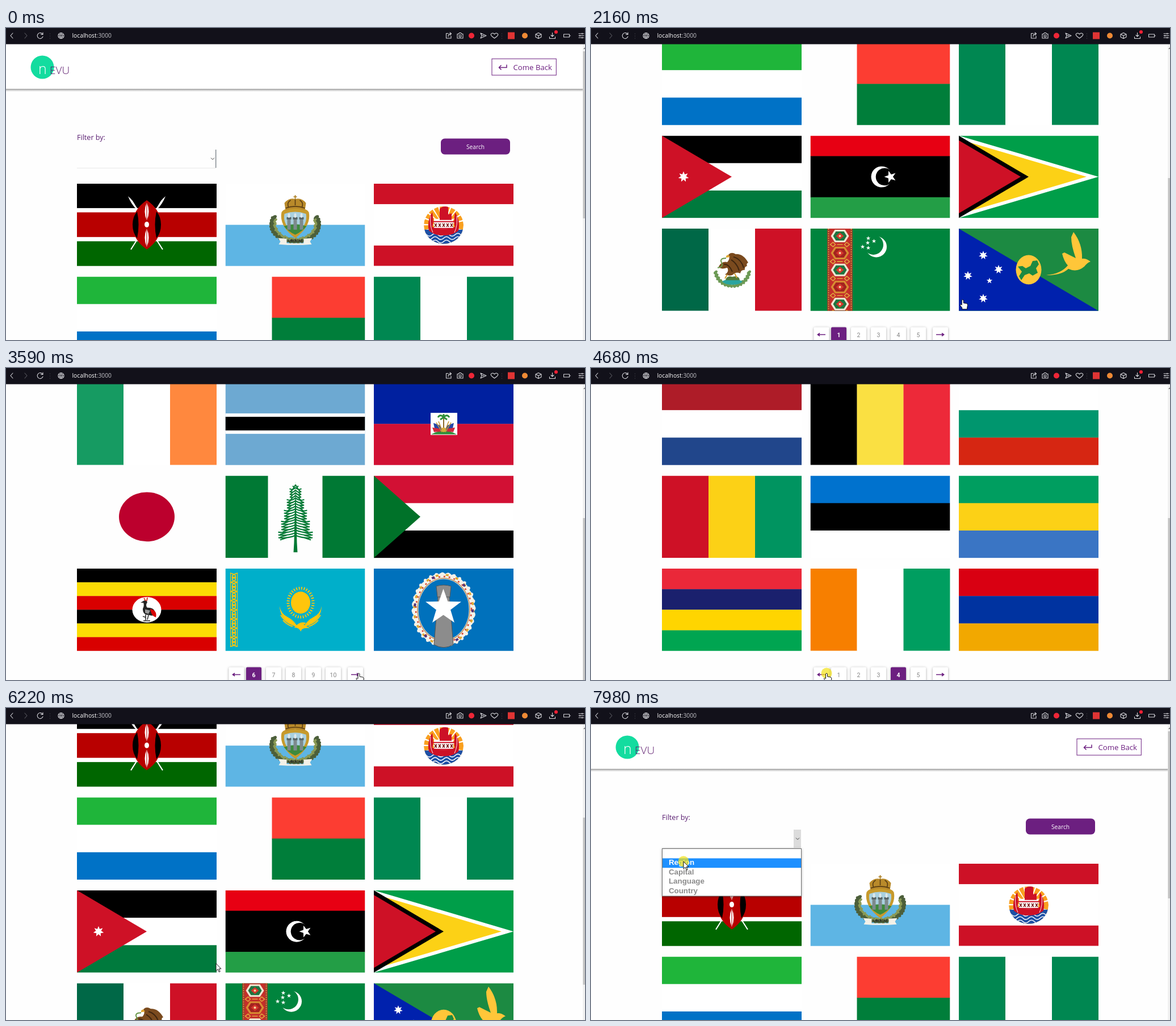
Recreate the animation shown at these times as an HTML page. Size 1020 by 549 pixels, loop 8 s.

```html
<!DOCTYPE html>
<html lang="en">
<head>
<meta charset="utf-8">
<title>Flags</title>
<style>
html, body { margin: 0; width: 100%; height: 100%; overflow: hidden; background: #fefefe; }
#stage { display: block; width: 1020px; height: 549px; }
text { font-family: "Open Sans", "Noto Sans", sans-serif; }
.num { font: 10.5px Roboto, Arial, sans-serif; text-anchor: middle; }
.opt { font: bold 13.3px "Liberation Sans", Arial, sans-serif; }
.box { filter: drop-shadow(0 1px 2px #0005); }
.line { fill: none; stroke: #d5d5da; stroke-width: 1.1; stroke-linecap: round; stroke-linejoin: round; }
</style>
</head>
<body>
<svg id="stage" viewBox="0 0 1020 549" xmlns="http://www.w3.org/2000/svg">
  <defs>
    <linearGradient id="shade" x2="0" y2="1">
      <stop offset="0" stop-color="#8a8a8a"/><stop offset=".4" stop-color="#b9b9b9"/><stop offset="1" stop-color="#fefefe"/>
    </linearGradient>
    <clipPath id="disc"><ellipse cx="123" cy="73" rx="35" ry="33"/></clipPath>
  </defs>
  <rect width="1020" height="549" fill="#fefefe"/>
  <g id="content">
    <rect y="106" width="1016" height="6" fill="url(#shade)"/>
    <rect y="20" width="1016" height="87" fill="#fff"/>
    <circle cx="64" cy="69" r="20.5" fill="#13dc9f"/>
    <text x="57" y="81" font-size="25" font-weight="300" fill="#fff">n</text>
    <text x="77" y="81" font-size="19" font-weight="300" fill="#5d1a6e">EVU</text>
    <rect x="856" y="54.2" width="113.3" height="28.8" fill="#fff" stroke="#6c1f80"/>
    <path d="M882 64.5V69.5H868.5M872.5 65.5L868.5 69.5 872.5 73.5" fill="none" stroke="#6c1f80" stroke-width="1.5"/>
    <text x="893.5" y="74" font-size="13.2" fill="#6c1f80">Come Back</text>
    <text x="125" y="197" font-size="12.6" fill="#5b1f72">Filter by:</text>
    <rect x="766" y="194.5" width="122" height="28" rx="7" fill="#6c1f80"/>
    <text x="827" y="212.5" font-size="10.2" fill="#fff" text-anchor="middle">Search</text>
    <path d="M125 246.5H370" stroke="#e9e9e9"/>
    <rect id="knob" x="357" y="214" width="13" height="32" fill="#dcdcdc"/>
    <path id="edge" d="M369.7 214V246" stroke="#6a737a" stroke-width="1.2"/>
    <path d="M361 228.5l3 3 3-3" fill="none" stroke="#444"/>
    <g id="pages"></g>
    <g id="pager"></g>
    <g id="menu"></g>
  </g>
  <rect x="1016" y="29" width="4" height="520" fill="#f1f1f1"/>
  <path d="M1017 37l3-3v3z" fill="#777"/>
  <rect id="thumb" x="1016.5" y="41" width="3.5" height="294" fill="#c4c4c4"/>
  <g id="bar"></g>
  <g id="popup">
    <path d="M373 498H461a4 4 0 0 1 4 4V517a4 4 0 0 1-4 4H421l-4 5-4-5H373a4 4 0 0 1-4-4V502a4 4 0 0 1 4-4z" fill="#d6d6d8" class="box"/>
    <path d="M422.5 499V520" stroke="#dededf"/>
    <text x="378" y="512.5" font-size="7.7" fill="#fff">Pesquisar</text>
    <text x="431" y="512.5" font-size="7.7" fill="#fff">Copiar</text>
  </g>
  <circle id="ring" r="9.5" fill="#f2e21c" opacity=".72"/>
  <path id="cursor" fill="#fff" stroke="#000" stroke-width=".9" stroke-linejoin="round"/>
</svg>
<script>
const $ = id => document.getElementById(id);
const W = 246, H = 145, PITCH = 163.5, TOP = 274, COLS = [125, 386.5, 648];
const PURPLE = '#6c1f80', MAX = 411.5;

// Shapes
const rect = (x, y, w, h, f) => `<rect x="${x}" y="${y}" width="${w}" height="${h}" fill="${f}"/>`;
const oval = (x, y, rx, ry, f, more = '') => `<ellipse cx="${x}" cy="${y}" rx="${rx}" ry="${ry}" fill="${f}" ${more}/>`;
const path = (d, f) => `<path d="${d}" fill="${f}"/>`;
const line = (d, s, w = 1, more = '') => `<path d="${d}" fill="none" stroke="${s}" stroke-width="${w}" ${more}/>`;
const range = (n, fn) => Array.from({ length: n }, (_, i) => fn(i)).join('');
function star(x, y, r, f, n = 5, inner = .4, turn = -90) {
  let d = '';
  for (let i = 0; i < n * 2; i++) {
    const a = (turn + i * 180 / n) * Math.PI / 180, q = i % 2 ? r * inner : r;
    d += (i ? 'L' : 'M') + (x + q * Math.cos(a)).toFixed(1) + ' ' + (y + q * Math.sin(a)).toFixed(1);
  }
  return path(d + 'Z', f);
}
const rows = (...c) => c.map((f, i) => rect(0, i * H / c.length, W, H / c.length + .3, f)).join('');
const cols = (...c) => c.map((f, i) => rect(i * W / c.length, 0, W / c.length + .3, H, f)).join('');
// Leaves along an arc from angle a to b
function leaves(x, y, rx, ry, a, b, n, f, size = 3) {
  return range(n, i => {
    const t = (a + (b - a) * i / (n - 1)) * Math.PI / 180;
    const px = (x + rx * Math.cos(t)).toFixed(1), py = (y + ry * Math.sin(t)).toFixed(1);
    return oval(px, py, size, size * .6, f, `transform="rotate(${i % 2 ? 50 : -40} ${px} ${py})"`);
  });
}

function kenya() {
  const spear = s => `<g transform="translate(123 72) scale(${s} 1)">` +
    line('M-27 -43L28 44', '#fff', 2) + path('M-33 -50Q-22 -41 -18 -27Q-27 -35 -33 -50Z', '#fff') + '</g>';
  return rows('#000', '#b00', '#060') + rect(0, 43, W, 58.5, '#fff') + rect(0, 50.5, W, 43.5, '#b80000') +
    spear(1) + spear(-1) +
    path('M123 29Q148 46 148 72Q148 99 123 116Q98 99 98 72Q98 46 123 29Z', '#b80000') +
    path('M106 49Q98 58 98 72Q98 87 106 96Q111 72 106 49ZM140 49Q148 58 148 72Q148 87 140 96Q135 72 140 49Z', '#000') +
    path('M123 33Q130 49 123 65Q116 49 123 33ZM123 79Q130 95 123 112Q116 95 123 79Z', '#fff') +
    line('M123 33V65M123 79V112', '#b80000', 1) + oval(123, 72, 4, 5, '#fff');
}
function sanMarino() {
  const tower = x => rect(x - 3, 62, 6, 19, '#7d8a8c') + rect(x - 4, 59, 8, 4, '#566466') + oval(x, 56, 2, 4, '#dfe8ea');
  return rows('#fff', '#5eb5e4') +
    leaves(123, 72, 41, 29, 205, 85, 26, '#4c5f3a', 5.5) + leaves(123, 72, 41, 29, -25, 95, 26, '#4c5f3a', 5.5) +
    leaves(123, 71, 36, 27, 195, 95, 12, '#8a9a55', 3.5) + leaves(123, 71, 36, 27, -15, 85, 12, '#8a9a55', 3.5) +
    path('M99 50Q104 42 123 44Q142 42 147 50Q152 74 123 96Q94 74 99 50Z', '#c79a2c') +
    path('M104 53Q123 46 142 53Q146 73 123 89Q100 73 104 53Z', '#a9d0df') +
    path('M103 75Q123 68 143 75Q136 84 123 90Q110 84 103 75Z', '#3d8a3c') + tower(112) + tower(123) + tower(134) +
    path('M106 47L104 34Q112 24 123 27Q134 24 142 34L140 47Q123 41 106 47Z', '#b98a2a') +
    line('M106 43Q123 37 140 43M111 41Q108 33 115 29M135 41Q138 33 131 29M123 38V28', '#5a3d13', 1.6) +
    line('M123 20V28M120 23H126', '#a87a1c', 1.6) +
    path('M93 96L108 97V105H138V97L153 96L149 102 152 107 137 108H109L94 107 97 102Z', '#f3f1e8') +
    '<text x="123" y="102.5" font-size="5.5" font-weight="700" text-anchor="middle" fill="#222">LIBERTAS</text>';
}
function polynesia() {
  const wave = i => line(`M83 ${90 + i * 6}` + 'q5 -5 10 0t10 0'.repeat(4), '#fff', 1.5);
  return rows('#fff') + rect(0, 0, W, 36, '#cd1126') + rect(0, 109, W, 36, '#cd1126') + '<g clip-path="url(#disc)">' +
    oval(123, 73, 25, 24, 'none', 'stroke="#f9a01f" stroke-width="20" stroke-dasharray="6 1.8"') +
    rect(88, 81, 70, 27, '#1d50a5') + range(3, wave) + '</g>' +
    path('M103 50Q106 70 103 76Q112 80 123 80Q134 80 143 76Q140 70 143 50Q153 66 149 83Q138 92 123 91Q108 92 97 83Q93 66 103 50Z', '#cd1126') +
    rect(106, 62, 34, 16, '#fff') + path('M116 64V44Q122 38 131 41V54L137 52V64Z', '#cd1126') +
    line('M103 67H143M103 79H143', '#cd1126', 2) +
    range(5, i => line(`M${107 + i * 7} 70l4 6m0 -6l-4 6`, '#7a1a1a', 1.6)) +
    line('M100 57Q98 74 104 86M146 57Q148 74 142 86', '#fff', .9);
}
const madagascar = () => rect(82, 0, 164, 73, '#fc3d32') + rect(82, 72.5, 164, 73, '#007e3a');
const jordan = () => rows('#000', '#fff', '#007a3d') + path('M0 0L123 72.5 0 145Z', '#ce1126') + star(38, 72.5, 9.5, '#fff', 7, .5);
const libya = () => rect(0, 0, W, 36.5, '#e70013') + rect(0, 36, W, 73, '#000') + rect(0, 108.5, W, 37, '#239e46') +
  oval(125.5, 72.5, 18.5, 18.5, '#fff') + oval(130.5, 72.5, 15.3, 15.3, '#000') + star(141, 72.5, 11, '#fff', 5, .4, 180);
const guyana = () => rows('#009e49') + path('M0 0L246 72.5 0 145Z', '#fff') + path('M0 6.2L225 72.5 0 138.8Z', '#fcd116') +
  path('M0 0L123 72.5 0 145Z', '#000') + path('M0 8.2L109 72.5 0 136.8Z', '#ce1126');
function mexico() {
  return cols('#006847', '#fff', '#ce1126') + leaves(124, 72, 30, 29, 170, 95, 14, '#6c9a55', 4) + leaves(124, 72, 30, 29, 10, 85, 14, '#6c9a55', 4) +
    path('M106 93Q124 84 142 93Q138 99 124 99Q110 99 106 93Z', '#2ba5a0') + path('M112 91Q114 82 124 85Q136 82 137 91Z', '#517a3c') +
    path('M117 46Q122 40 130 45Q143 44 152 60Q148 61 150 66Q145 67 146 73Q139 72 138 79Q130 75 124 82Q119 84 111 81Q119 76 115 69Q103 73 100 67Q105 57 115 59Q121 53 117 46Z', '#7a4a1e') +
    line('M126 50Q139 53 144 69M122 55Q132 61 136 74M109 63Q118 62 124 76', '#3f2610', 2) +
    path('M117 46Q112 47 113 51L120 50Z', '#e0a52f') + line('M113 52Q101 52 105 60T98 69', '#69984a', 2) +
    line('M115 81L111 88M128 79L132 87', '#d59d2d', 2);
}
function turkmenistan() {
  return rows('#00843d') + rect(30, 0, 44, H, '#c42f2a') + rect(30, 0, 4, H, '#9c3b2a') + rect(70, 0, 4, H, '#9c3b2a') +
    line('M32 0V145M72 0V145', '#e3a847', 1.5, 'stroke-dasharray="2 2"') +
    range(5, i => {
      const y = 13 + i * 30;
      return path(`M36 ${y}l7 -11h18l7 11 -7 11h-18z`, i % 2 ? '#d88d32' : '#f0e6d2') +
        path(`M40 ${y}l5 -8h14l5 8 -5 8h-14z`, i % 2 ? '#a3221f' : '#1e7440') +
        path(`M45 ${y}l7 -6 7 6 -7 6z`, '#d5372c') + oval(52, y, 2, 2, '#f4d8a0') +
        line(`M35 ${y + 15}l5 -4 4 4 -4 4zM60 ${y + 15}l4 -4 5 4 -5 4zM47 ${y + 15}h10`, '#e0a23d', 1.6);
    }) + oval(116, 32, 18.5, 18.5, '#fff') + oval(111, 28.5, 17.5, 17.5, '#00843d') +
    [[92, 32], [102, 17], [101, 25], [112, 22], [102, 34]].map(([x, y]) => star(x, y, 4, '#fff', 5)).join('');
}
function christmas() {
  return rows('#1c8a42') + path('M0 0L246 145H0Z', '#0021ad') + oval(123, 72.5, 22.5, 26, '#ffc639') +
    path('M104 67L112 66 118 70 126 66 130 57 138 56 141 63 136 70 139 78 130 83 124 79 116 82 110 91 106 84 111 76Z', '#1c8a42') +
    path('M154 82Q180 80 192 65Q185 57 182 44L186 42Q200 49 206 52Q198 30 198 15L202 6Q218 27 217 53Q224 52 232 58Q226 60 221 67Q208 78 193 71Q180 83 154 82Z', '#ffc639') +
    [[43, 47], [16, 83], [70, 72], [43, 123]].map(([x, y]) => star(x, y, 8, '#fff', 7, .48)).join('') + star(54, 92, 5.5, '#fff');
}

const trinidad = () => rows('#da1a35') + path('M0 0H76L246 145H170Z', '#fff') + path('M13 0H63L233 145H183Z', '#000');
const centralAfrica = () => rows('#003082', '#fff', '#289728', '#ffce00') + rect(103, 0, 41, H, '#d21034') + star(40, 20, 18, '#ffce00');
function macedonia() {
  const ray = (a, b, c, d) => path(`M${a} ${b}L${c} ${d} 123 72.5Z`, '#f8d616');
  return rows('#ce2028') + ray(0, 0, 37, 0) + ray(246, 0, 209, 0) + ray(0, 145, 37, 145) + ray(246, 145, 209, 145) +
    ray(111, 0, 135, 0) + ray(111, 145, 135, 145) + ray(0, 58, 0, 87) + ray(246, 58, 246, 87) +
    oval(123, 72.5, 22, 25.5, '#ce2028') + oval(123, 72.5, 17.5, 21, '#f8d616');
}
function salvador() {
  return rows('#0047ab', '#fff', '#0047ab') +
    oval(123, 72, 20, 20, 'none', 'stroke="#c6ae50" stroke-width="2.5" stroke-dasharray="2 1.2"') +
    leaves(123, 73, 15, 15, 195, 95, 12, '#2f8a3f', 3.5) + leaves(123, 73, 15, 15, -15, 85, 12, '#2f8a3f', 3.5) +
    path('M123 60L134 80H112Z', '#ddb64a') + path('M123 64L131 78H115Z', '#7cc3dc') + path('M115 78L119 73 123 76 127 72 131 78Z', '#287a46') +
    line('M111 83H135M112 63L118 70M134 63L128 70', '#1c4eaa', 2.5) + oval(123, 68, 1.5, 1.5, '#d64a32') + line('M115 88H131', '#d1ae45', 2);
}
function turks() {
  return rows('#012869') + '<svg width="123" height="72.5">' + rect(0, 0, 123, 73, '#012869') +
    line('M0 0L123 72.5M123 0L0 72.5', '#fff', 13) + line('M0 0L123 72.5M123 0L0 72.5', '#cf142b', 4.5) +
    line('M61.5 0V73M0 36.2H123', '#fff', 24) + line('M61.5 0V73M0 36.2H123', '#cf142b', 14) + '</svg>' +
    path('M161.5 41H207V74Q204 93 184 104Q164 93 161.5 74Z', '#fff') + path('M163.5 43H205V74Q202 91 184 101Q166 91 163.5 74Z', '#ffcf2e') +
    path('M168 52Q171 46 179 49L183 60 176 68Q172 61 168 59Z', '#eaa59a') + path('M171 52l7 8', '#cf8278') +
    line('M195 69V52M192 56L190 47M198 56L202 48M191 61H201M192 66H199', '#cf6d20', 2.8) +
    path('M176 96Q175 75 184 70Q194 75 193 96Z', '#19923c') + line('M181 94V78M188 94V78', '#0d6a2a', 1) + oval(184, 69, 4, 4.5, '#b61f2a');
}
const kosovo = () => rows('#244aa5') + range(6, i => star(64 + i * 23.8, [39, 32, 29][Math.min(i, 5 - i)], 9.8, '#fff')) +
  path('M77 76L88 72 93 60 105 58 109 49 118 44 127 54 137 52 141 61 153 64 157 74 174 79 166 89 163 101 148 105 138 109 121 113 118 124 110 122 107 109 97 103 86 92 79 86Z', '#d0a650');
const colombia = () => rect(0, 0, W, 73, '#fcd116') + rect(0, 72.5, W, 37, '#003893') + rect(0, 108.5, W, 37, '#ce1126');
const palau = () => rows('#09f') + oval(107.5, 72, 46, 43.5, '#ff0');

const botswana = () => rows('#6da9d2') + rect(0, 54, W, 36, '#fff') + rect(0, 60, W, 24, '#000');
function haiti() {
  return rows('#00209f', '#d21034') + rect(100, 53, 47, 39, '#fff') + path('M101 91Q123 78 146 91Z', '#2f8f3a') +
    path('M105 71L116 75 122 84 108 85ZM141 71L130 75 124 84 138 85Z', '#2547a8') + path('M103 79L116 81 118 86 106 87ZM143 79L130 81 128 86 140 87Z', '#d0283c') +
    line('M123 61V87', '#8a6a2a', 2) + line('M123 61Q117 54 113 61M123 61Q129 54 133 61M123 61L117 65M123 61L129 65M123 61V55', '#2f8f3a', 3) +
    line('M110 70L120 87M136 70L126 87M114 68L121 86M132 68L125 86', '#c79a35', 1.5) + oval(123, 83, 4, 4, '#d5aa3c');
}
function norfolk() {
  const branch = (i, s) => {
    const y = 20 + i * 4.7, w = (5 + i * 1.25 + (i * 7 % 4) * 1.4) * s;
    return line(`M123.5 ${y - 4}q${w * .5} 6 ${w} ${2 + i * .1}M${123.5 + w * .5} ${y}l${w * .4} 4`, '#007934', 2.1);
  };
  return rect(0, 0, 75, H, '#007934') + rect(171, 0, 75, H, '#007934') + path('M123.5 9L126 118 127 135H120L121 118Z', '#007934') +
    range(20, i => branch(i, 1) + branch(i, -1));
}
const sudan = () => rows('#d21034', '#fff', '#000') + path('M0 0L82 72.5 0 145Z', '#007229');
const uganda = () => rows('#000', '#fcdc04', '#d90000', '#000', '#fcdc04', '#d90000') + oval(123, 72.5, 25.5, 22.5, '#fff') +
  path('M117 57Q122 54 124 59Q120 65 124 69Q136 68 138 78Q137 85 127 82Q116 82 116 71Q119 65 117 60L112 60Z', '#222') +
  path('M129 71Q142 74 139 86Q131 84 129 71Z', '#d90000') + path('M120 72L129 74 126 80 120 78Z', '#9a9a9a') +
  line('M121 57L118 52M123 57L124 51', '#d92b10', 1.8) + line('M121 81V91M126 82L124 90M117 92H129M121 86L116 84', '#222', 1.5);
function kazakhstan() {
  const wing = s => `<g transform="translate(132.5 0) scale(${s} 1)">` +
    path('M-37 66Q-35 80 -22 86Q-12 91 -5 103Q-15 101 -21 95Q-36 86 -37 66Z', '#fec50c') +
    line('M-35 82Q-27 95 -14 99M-31 91Q-24 99 -14 102', '#fec50c', 2) + '</g>';
  return rows('#00afca') + line('M9 7V138M21 7V138', '#fec50c', 1) +
    range(8, i => line(`M9 ${8 + i * 16.2}q14 4 6 8t6 8M21 ${8 + i * 16.2}q-14 4 -6 8t-6 8M11 ${16 + i * 16.2}h8`, '#fec50c', 1.7)) +
    oval(132.5, 60, 17, 19.5, '#fec50c') + oval(132.5, 60, 22, 25.5, 'none', 'stroke="#fec50c" stroke-width="5" stroke-dasharray="1.8 2.7"') +
    wing(1) + wing(-1) + path('M121 104Q132 91 142 96L138 99 149 105Q134 103 133 111Q129 103 121 104Z', '#fec50c');
}
function mariana() {
  const ring = (r, color, w, dash) => oval(123, 72, r, r + 9, 'none', `stroke="${color}" stroke-width="${w}" stroke-dasharray="${dash}"`);
  return rows('#0071bc') + leaves(123, 72, 51, 60, 0, 354, 60, '#f4f2ea', 6.5) + ring(49, '#f4f2ea', 9, 'none') +
    ring(46, '#b98d5c', 1.5, 'none') + ring(49, '#d8452f', 2.5, '3 6') + ring(52, '#dda72d', 3.5, '5 13') +
    ring(51, '#54357c', 4, '5 55') +
    path('M110 31Q123 27 136 31L134 50H112ZM113 50H133L140 134Q123 144 106 134Z', '#8c8c8c') +
    line('M110 31Q123 27 136 31L134 50H112ZM113 50L106 134Q123 144 140 134L133 50', '#555', 1) + star(122.5, 68.5, 33, '#fff');
}

const PAGES = {
  1: [kenya(), sanMarino(), polynesia(), rows('#1fb53a', '#fff', '#0072c6'), madagascar(), cols('#008751', '#fff', '#008751'),
    jordan(), libya(), guyana(), mexico(), turkmenistan(), christmas()],
  2: [cols('#0055a4', '#fff', '#ef4135'), rows('#000', '#d00', '#ffce00'), rows('#ed2939', '#fff', '#ed2939'),
    rows('#fff', '#dc143c'), cols('#009246', '#fff', '#ce2b37'), rows('#0057b7', '#ffd700'),
    rows('#fdb913', '#006a44', '#c1272d'), cols('#14b53a', '#fcd116', '#ce1126'), rows('#ce2939', '#fff', '#477050')],
  3: [cols('#002664', '#fecb00', '#c60c30'), trinidad(), centralAfrica(), macedonia(), salvador(), turks(), kosovo(), colombia(), palau()],
  4: [rows('#ae1c28', '#fff', '#21468b'), cols('#000', '#fae042', '#ed2939'), rows('#fff', '#00966e', '#d62612'),
    cols('#ce1126', '#fcd116', '#009460'), rows('#0072ce', '#000', '#fff'), rows('#009e60', '#fcd116', '#3a75c4'),
    rows('#ea2839', '#1a206d', '#ffd500', '#00a551'), cols('#f77f00', '#fff', '#009e60'), rows('#d90012', '#0033a0', '#f2a800')],
  5: [rows('#ce1126', '#fff'), cols('#d91023', '#fff', '#d91023'), rows('#ed1c24', '#fff', '#00a1de'),
    rows('#ce1126', '#fff', '#000'), cols('#002b7f', '#fcd116', '#ce1126'), rows('#d52b1e', '#f9e300', '#007934'),
    rows('#9e3039', '#fff', '#9e3039'), rows('#fff', '#0039a6', '#d52b1e'), rows('#009b3a', '#fed100', '#ce1126')],
  6: [cols('#169b62', '#fff', '#ff883e'), botswana(), haiti(), oval(123, 72.5, 49, 43.5, '#bc002d'),
    norfolk(), sudan(), uganda(), kazakhstan(), mariana()]
};
$('pages').innerHTML = Object.entries(PAGES).map(([n, list]) => `<g id="page${n}">` + list.map((art, i) => {
  const row = Math.floor(i / 3) + (n > 1 ? 1 : 0);
  return `<svg x="${COLS[i % 3]}" y="${TOP + row * PITCH}" width="${W}" height="144.7" viewBox="0 0 ${W} ${H}" preserveAspectRatio="none">${art}</svg>`;
}).join('') + '</g>').join('');

// Browser bar
const icon = d => `<path class="line" d="${d}"/>`;
$('bar').innerHTML = rect(0, 0, 1020, 28.5, '#12111a') + icon('M12 9l-4 4.5 4 4.5') +
  `<g opacity=".35">${icon('M33 9l4 4.5 -4 4.5M77.5 10v.1M77.5 14v.1M77.5 18v.1M873.5 10v.1M873.5 14v.1M873.5 18v.1')}</g>` +
  icon('M64.5 11A5 5 0 1 0 65 15M65 8v3.5h-3.5') +
  icon('M92 13.5a5 5 0 1 0 10 0a5 5 0 1 0-10 0zM92 12h10M92 15.5h10M97 8.5q-4 5 0 10q4-5 0-10') +
  '<text x="116.5" y="17" font-size="10.3" fill="#fff">localhost<tspan fill="#c3c3c8">:3000</tspan></text>' +
  icon('M779 9.5h-3.5v8.5h8.5v-4M779 15q0-5 5-5M782 8l2.5 2-2.5 2.5') +
  icon('M795 10.5h2.5l1-2h3l1 2h2.5v7.5h-10zM798 14a2 2 0 1 0 4 0a2 2 0 1 0-4 0') + oval(820, 13.5, 5, 5, '#ee2637') +
  icon('M836 9l10 4.5-10 4.5 2-4.5zM838 13.5h4') + icon('M860.5 18Q850 11 857 9Q859.5 9 860.5 11Q861.5 9 864 9Q871 11 860.5 18z') +
  rect(884, 7.5, 12, 12, '#df3434') + oval(914, 13.5, 5, 5, '#ee8a35') +
  icon('M938 8.5l5 2.5v5l-5 2.5-5-2.5v-5zM933 11l5 2.5 5-2.5M938 13.5v5') +
  icon('M962.5 8.5v6.5M960 12.5l2.5 2.5 2.5-2.5M957.5 15.5v3h10v-3') + oval(969, 7, 3, 3, '#ff2035') +
  icon('M982.5 11h10v5h-10zM994 13v1') + icon('M1009 10h9M1009 13.5h9M1009 17h9M1015 9v2M1011 12.5v2M1015 16v2');

function pager(page, picked) {
  const first = page > 5 ? 6 : 1, y = 938;
  const box = (x, f) => `<rect class="box" x="${x - 13.5}" y="${y}" width="27" height="27" rx="2" fill="${f}"/>`;
  const arrow = (x, s) => line(`M${x - 7 * s} 951H${x + 6 * s}M${x + 3 * s} 948.5L${x + 6.5 * s} 951 ${x + 3 * s} 953.5`, PURPLE, 1.7);
  return box(406, '#fff') + (picked ? rect(399, 944.5, 14, 14, '#3390ff') + line('M400 951H413', '#1f5fc4', 1.5) : arrow(406, -1)) +
    box(615.5, '#fff') + arrow(615, 1) + range(5, i => {
      const n = first + i, x = 436.5 + i * 35, on = n === page;
      return box(x, on ? PURPLE : '#fff') + `<text class="num" x="${x}" y="955" fill="${on ? '#fff' : '#858585'}" ${on ? 'style="font-weight:700"' : ''}>${n}</text>`;
    });
}
function menu(active) {
  return `<rect class="box" x="125.5" y="247.5" width="245" height="83.5" fill="#fff" stroke="#6f6f6f"/>` +
    rect(126, 247.8 + active * 16.7, 244, 16.7, '#1e90ff') +
    ['', 'Region', 'Capital', 'Language', 'Country'].map((s, i) =>
      `<text class="opt" x="137" y="${259.3 + i * 16.7}" fill="${i === active ? '#fff' : '#8b8b8b'}">${s}</text>`).join('');
}

// Timing: bursts [start, end, steps], then keyed values
const BURSTS = [[0, 0, 1], [70, 820, 12], [950, 1300, 6], [1630, 2370, 12], [2510, 3260, 12], [3450, 4130, 11], [4280, 4810, 9],
  [5020, 5750, 12], [5880, 6680, 13], [6740, 7490, 12], [7560, 7780, 4], [7980, 7980, 1]];
const SCROLL = [[890, 0], [950, 60], [1160, 319], [1230, 383], [1300, MAX], [6080, MAX], [6213, 280.5], [6350, 138], [6500, 40], [6640, 0]];
const MOUSE = [[70, 764, 450], [300, 690, 420], [560, 560, 330], [820, 489, 289], [1620, 489, 289], [1830, 540, 360], [2080, 650, 470],
  [2200, 677, 515], [2370, 621.5, 537], [3600, 621.5, 537], [3850, 540, 528], [4130, 415, 537], [5870, 415, 537], [6000, 392, 490],
  [6213, 370, 449.5], [6680, 374, 392], [7000, 372, 300], [7220, 364, 229], [7500, 362, 233], [7780, 163, 270]];
const CLICKS = [[2510, 2], [2760, 3], [2930, 4], [3100, 5], [3450, 6], [4280, 5], [4600, 4], [5020, 3], [5480, 2], [5600, 1], [7290, 1], [7980, 1]];
const ARROW = 'M0 0V13L3 10.2 5.2 15 7.2 14.2 5 9.5H9Z';
const HAND = 'M-1.5 1.2Q0 -1 1.5 1.2V6L7 7Q9 7.6 8.8 10L8 14V17H-1V14.5L-4.5 10Q-4.5 7.5 -1.5 9.5Z';

function snap(t) {
  const [a, b, n] = BURSTS.filter(r => r[0] <= t).pop();
  if (n < 2) return a;
  const d = (b - a) / (n - 1);
  return a + d * Math.min(n - 1, Math.floor((t - a) / d + .01));
}
function at(keys, t, k = 1) {
  const i = keys.findIndex(r => r[0] > t);
  if (i === 0) return keys[0][k];
  if (i < 0) return keys[keys.length - 1][k];
  const p = keys[i - 1], q = keys[i];
  return p[k] + (q[k] - p[k]) * (t - p[0]) / (q[0] - p[0]);
}
function isLink(x, y, scroll) {
  if (y > 526 && scroll > 400) return x > 393 && x < 629;
  const py = y + scroll - TOP;
  return py >= 0 && py % PITCH < H && COLS.some(c => x >= c && x < c + W - 1.5);
}
const show = (id, on) => $(id).setAttribute('visibility', on ? 'visible' : 'hidden');
const last = {};
function fill(id, key, make) {
  if (last[id] === key) return;
  last[id] = key;
  $(id).innerHTML = make();
}

function render(time) {
  const t = snap(time), scroll = at(SCROLL, t), x = at(MOUSE, t), y = at(MOUSE, t, 2);
  const click = CLICKS.filter(c => c[0] <= t + .5).pop(), page = click ? click[1] : 1;
  const picked = t >= 5150 && t < 5480, open = t >= 7290;
  const hover = open || (x > 125 && x < 370 && y > 214 && y < 246 && scroll === 0);

  $('content').setAttribute('transform', `translate(0 ${-scroll})`);
  $('thumb').setAttribute('y', 41 + scroll * .542);
  for (const n in PAGES) $('page' + n).style.display = +n === page ? '' : 'none';
  fill('pager', page + '/' + picked, () => pager(page, picked));
  const active = y >= 264 ? 1 : 0;
  fill('menu', open ? active : -1, () => open ? menu(active) : '');
  show('knob', hover);
  show('edge', !hover);
  show('popup', picked);
  $('popup').setAttribute('opacity', Math.max(0, Math.min(1, (t - 5100) / 200)));

  show('cursor', t >= 70);
  $('cursor').setAttribute('d', t < 6740 && isLink(x, y, scroll) ? HAND : ARROW);
  $('cursor').setAttribute('transform', `translate(${x} ${y})`);
  show('ring', click && t - click[0] < 130);
  $('ring').setAttribute('transform', `translate(${x} ${y})`);
}

const start = performance.now();
function tick() {
  render((performance.now() - start) % 8000);
  requestAnimationFrame(tick);
}
render(0);
requestAnimationFrame(tick);
</script>
</body>
</html>
```
